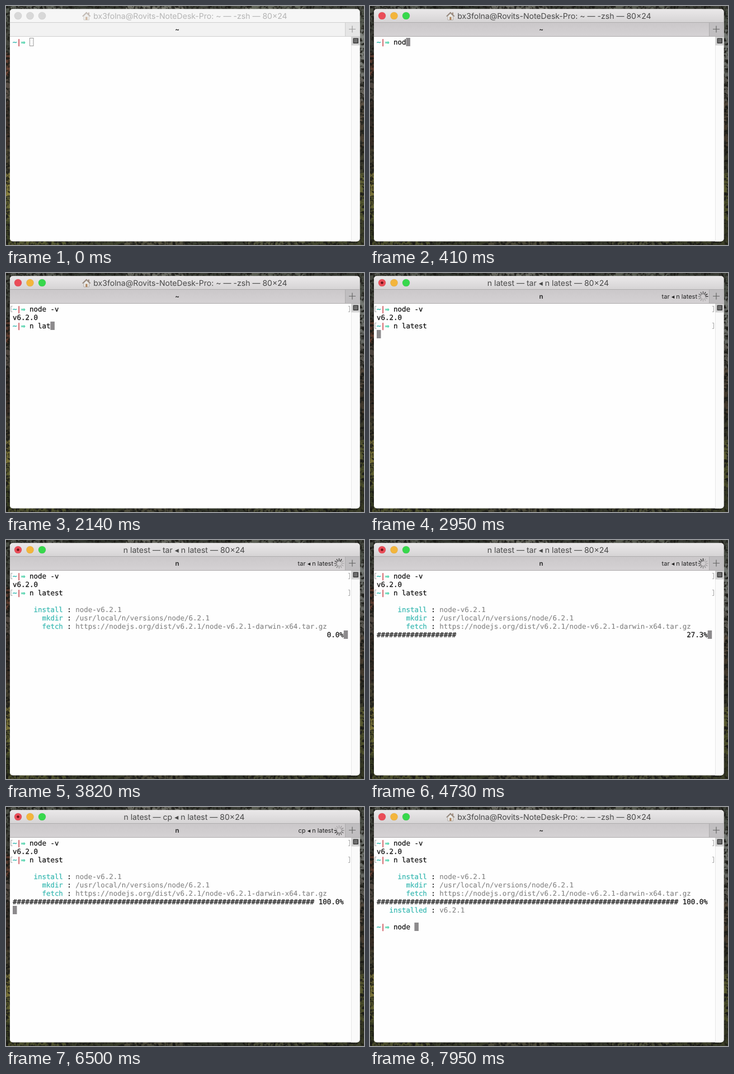
An HTML page for the animation above (8000 ms loop, 640 by 428 pixels).

```html
<!DOCTYPE html>
<html lang="en">
<head>
<meta charset="utf-8">
<title>Terminal session</title>
<style>
  html, body { margin: 0; width: 100%; height: 100%; overflow: hidden; }
  svg { display: block; width: 640px; height: 428px; text-rendering: geometricPrecision; }
  .mono { font: 12.44px "DejaVu Sans Mono", monospace; white-space: pre; }
  .ui { font-family: Inter, "DejaVu Sans", sans-serif; }
</style>
</head>
<body>
<svg viewBox="0 0 640 428">
  <defs>
    <linearGradient id="bar" x2="0" y2="1">
      <stop stop-color="#ebe9ea"/><stop offset="1" stop-color="#d5d3d4"/>
    </linearGradient>
    <linearGradient id="tab" x2="0" y2="1">
      <stop stop-color="#cbc8ca"/><stop offset="1" stop-color="#d5d2d4"/>
    </linearGradient>
    <clipPath id="frame"><rect x="7" y="5.500" width="625.500" height="416" rx="5"/></clipPath>
    <filter id="soft"><feGaussianBlur stdDeviation=".6"/></filter>
  </defs>
  <rect width="640" height="428" fill="#2f3029"/>
  <g id="scenery" filter="url(#soft)"></g>
  <g id="shade"></g>
  <g clip-path="url(#frame)">
    <rect x="7" y="5" width="626" height="417" fill="#fefefe"/>
    <g id="chrome"></g>
    <rect x="617" y="55" width="16" height="367" fill="#fafafa"/>
    <path d="M617.500 55V422" stroke="#e6e6e6"/>
    <rect x="617" y="55" width="16" height="15.500" fill="#d2d2d2"/>
    <rect x="620.500" y="57.500" width="9.500" height="9.500" rx="1" fill="#3c3c3c"/>
    <path d="M622 60h6.500M622 62.200h6.500M622 64.400h6.500" stroke="#c8c8c8" stroke-width=".8"/>
    <g id="screen"></g>
  </g>
</svg>
<script>
const LOOP = 8000, ADVANCE = 7.49, LEFT = 12;
const TEAL = '#39b9b2', GREEN = '#45cfa6', RED = '#c8434b', GREY = '#808080', BLACK = '#111';
const HOST_TITLE = 'bx3folna@Rovits-NoteDesk-Pro: ~ — -zsh — 80×24';

const $ = id => document.getElementById(id);
const colX = col => LEFT + col * ADVANCE;

const text = (x, y, str, fill, attrs) => `<text x="${x}" y="${y}" fill="${fill}" ${attrs}>${str}</text>`;
const mono = (row, col, str, fill = BLACK, weight = 0.25) =>
  text(colX(col), 69 + 15 * row, str, fill, `class="mono" stroke="${fill}" stroke-width="${weight}"`);
const ui = (x, y, str, fill, size, anchor = 'middle') =>
  text(x, y, str, fill, `class="ui" font-size="${size}" text-anchor="${anchor}"`);

// Woodland desktop, visible only around the window.
function paintScenery() {
  let seed = 11;
  const rand = () => (seed = (seed * 16807) % 2147483647) / 2147483647;
  let out = '';
  const strip = (x, y, w, h, colors) => {
    const along = h > w, count = Math.max(w, h);
    for (let i = 0; i < count; i++) {
      const u = (i + rand()) / count;
      const fill = rand() < 0.35 ? '#1d1d18' : colors[Math.floor(u * colors.length)];
      out += `<ellipse cx="${x + w * (along ? rand() : u)}" cy="${y + h * (along ? u : rand())}"
        rx="${1 + rand() * 3}" ry="${1 + rand() * 2.5}" fill="${fill}" opacity="${0.4 + rand() * 0.5}"/>`;
    }
  };
  strip(0, 0, 640, 6, ['#60645a', '#3a3e36', '#74756b', '#45483f', '#65695d', '#43463e']);
  strip(0, 0, 7, 428, ['#555a50', '#45463f', '#6f4536', '#5a5149', '#3f342c',
    '#42352b', '#4f4a36', '#8c8440', '#6f7038', '#434a28']);
  strip(633, 0, 7, 428, ['#555a50', '#858984', '#7d807a', '#6b6861', '#5d5143',
    '#4d4234', '#40402f', '#656636', '#56592f', '#3d4029']);
  strip(0, 421, 640, 7, ['#5c5f35', '#41452e', '#555340', '#3c4031', '#57593f', '#45492e']);
  $('scenery').innerHTML = out;
}

const house = opacity => `<g opacity="${opacity}">
  <path d="M139 18v7h9.500v-7l-4.700-4.500z" fill="#ececea" stroke="#9a948d" stroke-width=".7"/>
  <path d="M147 11.500h2v4h-2z" fill="#a08a7c"/>
  <path d="M136.800 18.700l7-6.900 7 6.900" fill="none" stroke="#95877c" stroke-width="1.700"/>
  <path d="M142.200 19.500h3.400v5.500h-3.400z" fill="#b08660"/></g>`;

function spinner(t) {
  const head = Math.floor(t / 83.4) + 4;
  let out = '';
  for (let i = 0; i < 12; i++) {
    const age = ((head - i) % 12 + 12) % 12;
    out += `<path d="M595.500 37.500v-4" stroke="#333" stroke-width="1.500" stroke-linecap="round"
      opacity="${Math.max(0.2, 1 - age * 0.09)}" transform="rotate(${i * 30} 595.5 42)"/>`;
  }
  return out;
}

function chrome(t, focused, job) {
  const ink = focused ? '#484848' : '#b4b4b4';
  const line = focused ? '#aeacad' : '#cfcfcf';
  let out = `<rect x="7" y="5" width="626" height="25" fill="${focused ? 'url(#bar)' : '#f6f6f6'}"/>
    <rect x="7" y="30" width="626" height="25" fill="${focused ? 'url(#tab)' : '#f2f2f2'}"/>
    <rect x="607" y="30" width="26" height="25" fill="${focused ? '#c0bec0' : '#e5e5e5'}"/>
    <path d="M7 29.500H633M7 54.500H633M606.500 30V54" stroke="${line}"/>
    <path d="M613 41.500h12M619 35.500v12" stroke="${focused ? '#666' : '#9a9a9a'}" stroke-width="1.200"/>`;
  ['#ea4d58', '#f3b53c', '#37d84c'].forEach((color, i) => {
    out += `<circle cx="${21.5 + 21.5 * i}" cy="17.500" r="6.600" fill="${focused ? color : '#d8d8d8'}"
      stroke="#000" stroke-opacity=".1" stroke-width=".6"/>`;
  });
  if (job) {
    out += '<circle cx="21.500" cy="17.500" r="2.300" fill="#6d1017"/>'
      + ui(318.5, 22.5, `n latest — ${job} ◂ n latest — 80×24`, ink, 14.05)
      + ui(585, 46, `${job} ◂ n latest`, '#222', 11, 'end') + spinner(t);
  } else {
    out += house(focused ? 1 : 0.55) + ui(329.5, 22.5, HOST_TITLE, ink, 14.05);
  }
  return out + text(306, 46, job ? 'n' : '~', '#222',
    'class="ui" font-size="11.500" font-weight="600" text-anchor="middle"');
}

const prompt = (row, command, done) =>
  mono(row, 0, '~', TEAL, 0.5) + mono(row, 1, '|', RED, 0.5) + mono(row, 2, '⇒', GREEN, 0.5)
  + mono(row, 4, command)
  + (done ? `<path d="M11.500 ${59.5 + 15 * row}h-2.500v10h2.500M612 ${59.5 + 15 * row}h2.500v10h-2.500"
      fill="none" stroke="#a5a5a5"/>` : '');

const logLine = (row, label, value) =>
  mono(row, 12 - label.length, label, TEAL) + mono(row, 13, ':') + mono(row, 15, value, GREY, 0.1);

const typed = (str, t, start, step) =>
  str.slice(0, Math.max(0, Math.floor((t - start) / step) + 1));

const cursor = (row, col, focused) => focused
  ? `<rect x="${colX(col)}" y="${57 + 15 * row}" width="7.500" height="15" fill="#8c8a8c"/>`
  : `<rect x="${colX(col) + 0.5}" y="${57.5 + 15 * row}" width="6.500" height="14" fill="none" stroke="#999"/>`;

function screen(t, focused) {
  const first = typed('node -v', t, 200, 85);
  let out = prompt(0, first, t >= 800);
  if (t < 800) return out + cursor(0, 4 + first.length, focused);

  const second = typed('n latest', t, 1760, 90);
  out += mono(1, 0, 'v6.2.0') + prompt(2, second, t >= 2550);
  if (t < 2550) return out + cursor(2, 4 + second.length, true);
  if (t < 3000) return out + cursor(3, 0, true);

  out += logLine(4, 'install', 'node-v6.2.1') + logLine(5, 'mkdir', '/usr/local/n/versions/node/6.2.1')
    + logLine(6, 'fetch', 'https://nodejs.org/dist/v6.2.1/node-v6.2.1-darwin-x64.tar.gz');
  if (t < 3250) return out + cursor(7, 0, true);

  // The download meter refreshes ten times a second.
  const tick = Math.floor((t - 4130) / 100) * 100;
  const percent = Math.min(100, Math.max(0, tick * 0.0455));
  const label = percent.toFixed(1) + '%';
  out += mono(7, 0, '#'.repeat(Math.floor(percent * 0.72))) + mono(7, 79 - label.length, label);
  if (percent < 100) return out + cursor(7, 79, true);
  if (t < 6800) return out + cursor(8, 0, true);

  const third = typed('node -v', t, 7540, 90);
  return out + logLine(8, 'installed', 'v6.2.1') + prompt(10, third, false)
    + cursor(10, 4 + third.length, true);
}

function render(t) {
  const focused = t >= 100;
  const job = t < 2550 || t >= 6800 ? '' : t < 6400 ? 'tar' : 'cp';
  $('shade').innerHTML = `<rect width="640" height="428" opacity="${focused ? 0.12 : 0}"/>`;
  $('chrome').innerHTML = chrome(t, focused, job);
  $('screen').innerHTML = screen(t, focused);
}

function frame() {
  render(performance.now() % LOOP);
  requestAnimationFrame(frame);
}

paintScenery();
frame();
</script>
</body>
</html>
```
